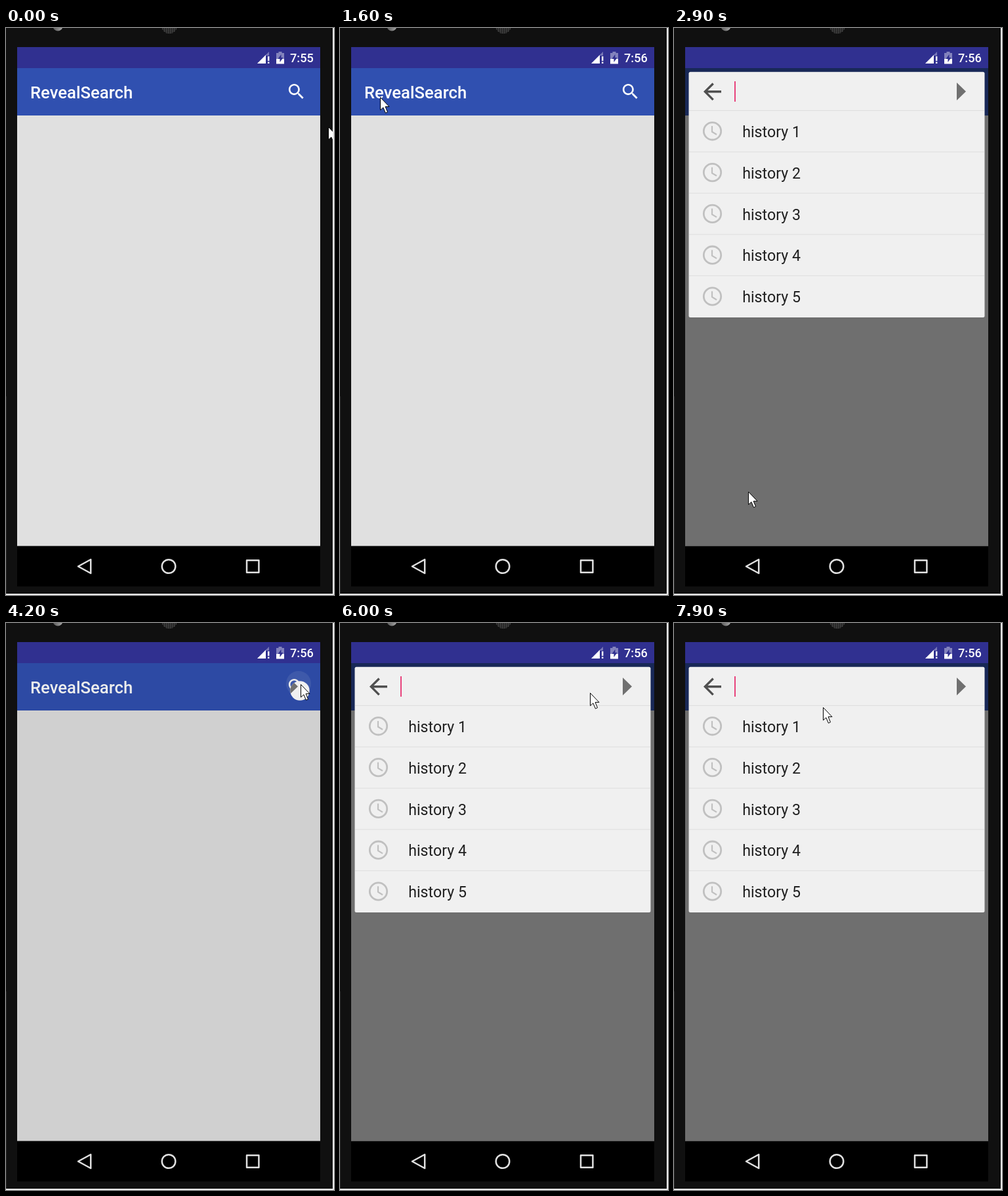
Write an HTML page that moves like this. It is 500x862 px and loops after 8 s.

```html
<!DOCTYPE html>
<html lang="en">
<head>
<meta charset="utf-8">
<title>RevealSearch</title>
<style>
  html, body { margin: 0; width: 100%; height: 100%; overflow: hidden; background: #101010; }
  svg { display: block; width: 500px; height: 862px; }
  text { font-family: Roboto, sans-serif; white-space: pre; }
  .row, #query { font-size: 23.2px; fill: #212121; }
</style>
</head>
<body>
<svg viewBox="0 0 500 862" xmlns="http://www.w3.org/2000/svg">
  <defs>
    <clipPath id="reveal"><circle id="hole" cx="448" cy="103" r="0"/></clipPath>
    <clipPath id="phone"><rect width="498" height="860"/></clipPath>
    <pattern id="mesh" width="3" height="3" patternUnits="userSpaceOnUse">
      <rect width="3" height="3" fill="#1c1c1c"/>
      <circle cx="1.5" cy="1.5" r="1" fill="#5a5a5a"/>
    </pattern>
    <linearGradient id="lens">
      <stop offset="0" stop-color="#555"/><stop offset="1" stop-color="#aaa"/>
    </linearGradient>
  </defs>

  <!-- device -->
  <rect width="500" height="862" fill="#e8e8e8"/>
  <rect width="498" height="860" fill="#101010"/>
  <circle cx="79" cy="-3" r="7.5" fill="url(#lens)"/>
  <circle cx="249" cy="-3.5" r="12" fill="url(#mesh)"/>
  <path d="M.5 560V860" stroke="#242424"/>
  <rect x="17" y="787" width="462" height="62"/>

  <!-- status bar -->
  <rect x="17" y="29" width="462" height="32" fill="#303090"/>
  <path d="M383 54L401 36V42H396V54Z" fill="#7676b6"/>
  <path d="M383 54L396 41V54Z" fill="#fff"/>
  <path d="M399 43h2.4v7h-2.4zM399 51.6h2.4v2.4h-2.4z" fill="#fff"/>
  <path d="M415.5 36h5v2h3.5v9h-12v-9h3.5z" fill="#8383bd"/>
  <path d="M412 47h12v7.5h-12z" fill="#fff"/>
  <path d="M419.5 40l-5 7h3v5l5-7h-3z" fill="#303090"/>
  <text id="clock" x="433" y="52" font-size="18.2" font-weight="500" fill="#fff"></text>

  <!-- app -->
  <rect x="17" y="133" width="462" height="654.5" fill="#e0e0e0"/>
  <rect x="17" y="61" width="462" height="72" fill="#3050b0"/>
  <text x="37" y="106.8" font-size="25.7" font-weight="500" fill="#fff">RevealSearch</text>
  <circle id="ripple" cx="446" cy="92" r="19" fill="#fff" fill-opacity=".09"/>
  <path transform="translate(427 81.1) scale(1.3)" fill="#fff" d="M15.5 14h-.79l-.28-.27C15.41 12.59 16 11.11 16 9.5 16 5.91 13.09 3 9.5 3S3 5.91 3 9.5 5.91 16 9.5 16c1.61 0 3.09-.59 4.23-1.57l.27.28v.79l5 4.99L20.49 19l-4.99-5zm-6 0C7.01 14 5 11.99 5 9.5S7.01 5 9.5 5 14 7.01 14 9.5 11.99 14 9.5 14z"/>
  <rect id="dim" x="17" y="61" width="462"/>

  <!-- search card -->
  <g id="card" clip-path="url(#reveal)">
    <rect x="22.5" y="66.7" width="451" height="373.3" rx="2.5" fill="#f0f0f0"/>
    <path transform="translate(38.2 76.5) scale(1.69)" fill="#505050" d="M20 11H7.83l5.59-5.59L12 4l-8 8 8 8 1.41-1.41L7.83 13H20z"/>
    <path d="M431 83V110L445 96.5Z" fill="#707070"/>
    <path id="clear" d="M376 88.5l16 16M392 88.5l-16 16" stroke="#707070" stroke-width="2.4"/>
    <text id="query" x="91.3" y="105.2"></text>
    <rect id="caret" y="81" width="2" height="31" fill="#e8437c"/>
    <g id="rows"></g>
  </g>

  <!-- navigation buttons -->
  <g fill="none" stroke="#e0e0e0" stroke-width="2.5" stroke-linejoin="round">
    <path d="M110 818.5L129.2 808V829Z"/>
    <circle cx="248" cy="818.5" r="10.3"/>
    <rect x="367" y="809.3" width="18.4" height="18.4"/>
  </g>

  <g clip-path="url(#phone)">
    <path id="pointer" d="M.5 .5V19.8L4.9 15.9 8.4 24.2 11.5 22.8 8.1 14.6H14Z" fill="#fff" stroke="#000"/>
  </g>
</svg>
<script>
const LOOP = 8000, STEP = 100, SPAN = 300, RADIUS = 600;
const $ = id => document.getElementById(id);
const set = (id, attrs) => {
  for (const k in attrs) $(id).setAttribute(k, attrs[k]);
};
const show = (id, on) => set(id, { visibility: on ? 'inherit' : 'hidden' });
const clamp = (v, max = 1) => Math.max(0, Math.min(max, v));
const ease = p => (1 - Math.cos(Math.PI * p)) / 2;
const easeOut = p => 1 - (1 - p) ** 3;
const last = (list, t) => list.filter(e => e.from <= t).pop();

$('rows').innerHTML = [1, 2, 3, 4, 5].map(n => `
  <g transform="translate(0 ${(n - 1) * 62.8})">
    <path d="M23 125.5H473" stroke="#dedede"/>
    <g fill="none" stroke="#c0c0c0" stroke-width="2.8">
      <circle cx="58.5" cy="156.8" r="13.2"/>
      <path d="M58 149V157.8L65 162" stroke-width="2.2"/>
    </g>
    <text class="row" x="104.2" y="166">history ${n}</text>
  </g>`).join('');

const spot = {
  edge: [491, 150], search: [449, 93], back: [61, 105], nav: [111.5, 827], field: [238, 97],
  clear: [381, 106], play: [446, 104], card: [272, 128], list: [227, 128]
};
const moves = [
  { from: 0, to: 300, at: 'search' },
  { from: 600, to: 1200, at: 'back' },
  { from: 1600, to: 2100, at: 'search' },
  { from: 2400, to: 3000, at: 'nav' },
  { from: 3300, to: 3900, at: 'search' },
  { from: 4300, to: 4700, at: 'field' },
  { from: 5200, to: 5800, at: 'clear' },
  { from: 6500, to: 6700, at: 'play' },
  { from: 6800, to: 7200, at: 'search' },
  { from: 7400, to: 7700, at: 'card' },
  { from: 7800, to: 7900, at: 'list' }
];
// when the search card opens and closes
const visits = [
  { from: -LOOP, to: -SPAN },
  { from: 370, to: 1270 },
  { from: 2270, to: 3270 },
  { from: 4170, to: 6770 },
  { from: 7370, to: LOOP }
];
// each burst types up to three letters, one per gap
const bursts = [
  { from: 4800, to: 5900, gap: 100 },
  { from: 6200, to: 7100, gap: 150 }
];

function pointerAt(t) {
  const move = last(moves, t), i = moves.indexOf(move);
  const [x0, y0] = spot[i ? moves[i - 1].at : 'edge'], [x1, y1] = spot[move.at];
  const k = clamp((t - move.from) / (move.to - move.from));
  return [x0 + (x1 - x0) * easeOut(k), y0 + (y1 - y0) * k];
}

function letters(t) {
  const b = last(bursts, t);
  return b && t < b.to ? clamp(Math.floor((t - b.from) / b.gap) + 1, 3) : 0;
}

function draw(t) {
  const { from, to } = last(visits, t);
  const closing = t >= to;
  const p = clamp((t - (closing ? to : from)) / SPAN);
  const fade = clamp(p * 1.4);

  set('dim', { height: closing ? 384 : 726.5, opacity: (closing ? 1 - fade : fade) / 2 });
  set('hole', { r: RADIUS * (closing ? 1 - ease(p) : ease(p)) });
  show('card', closing ? p < 1 : p > 0);
  show('ripple', visits.some(v => t >= v.from - 70 && t < v.from + 230));

  const count = letters(t);
  $('query').textContent = 'a'.repeat(count);
  show('clear', count > 0);
  const blink = t - from - 530;
  show('caret', !closing && blink >= 0 && blink % 1000 < 500);
  set('caret', { x: 92 + count * 12.62 });

  $('clock').textContent = t < 500 ? '7:55' : '7:56';
  set('pointer', { transform: `translate(${pointerAt(t)})` });
  show('pointer', t < 6200 || t >= 6500);
}

function tick() {
  draw(Math.floor((performance.now() % LOOP) / STEP) * STEP);
  requestAnimationFrame(tick);
}
tick();
</script>
</body>
</html>
```
